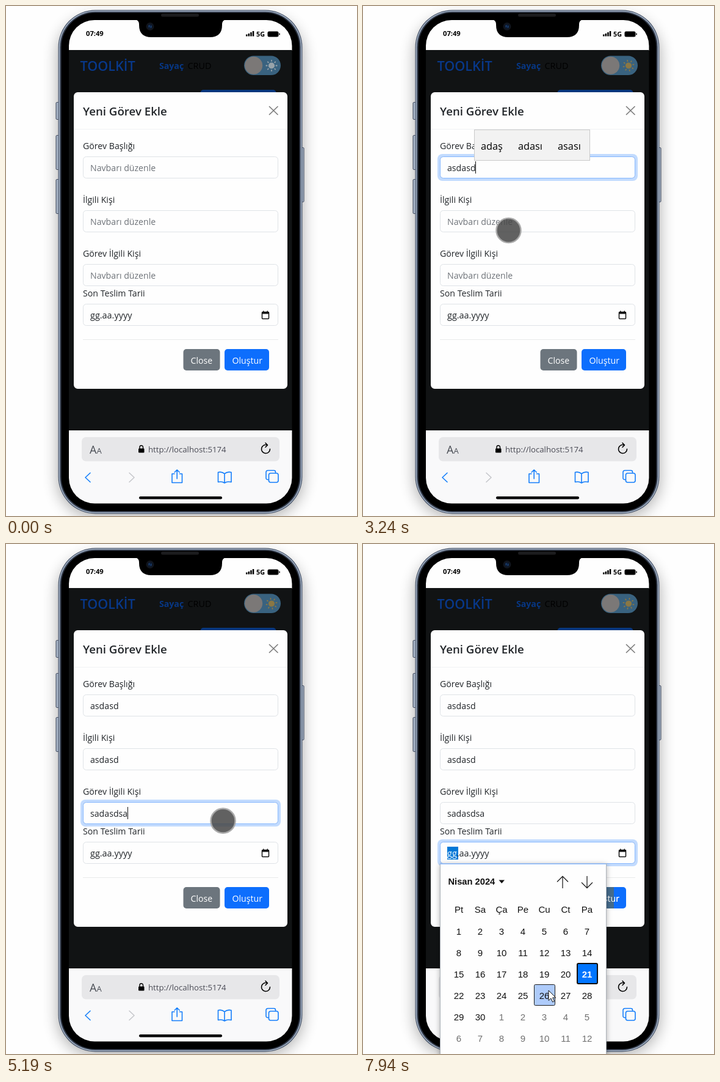
Recreate the animation shown at these times as an HTML page. Size 575 px wide and 834 px high, loop 7990 ms.

```html
<!DOCTYPE html>
<html lang="tr">
<head>
<meta charset="utf-8">
<title>Yeni Görev Ekle</title>
<style>
  html, body { margin: 0; width: 100%; height: 100%; overflow: hidden; background: #fefefe; }
  svg { display: block; width: 575px; height: 834px; font: 14.15px "Open Sans", "Noto Sans", sans-serif; fill: #212529; }
  .mid { text-anchor: middle; }
  .semi { font-weight: 600; }
  .line { fill: none; stroke-linecap: round; stroke-linejoin: round; }
  .ios { stroke: #147efb; stroke-width: 1.6; }
  .calendar { font: 15px "Liberation Sans", Arial, sans-serif; fill: #111; }
</style>
</head>
<body>
<svg id="stage" viewBox="0 0 575 834">
  <defs>
    <filter id="soft" x="-20%" y="-20%" width="140%" height="140%"><feGaussianBlur stdDeviation="12"/></filter>
    <filter id="lift" x="-20%" y="-20%" width="140%" height="140%">
      <feDropShadow dx="0" dy="1" stdDeviation="2" flood-opacity=".28"/>
    </filter>
    <filter id="float" x="-20%" y="-20%" width="140%" height="140%">
      <feDropShadow dx="0" dy="2" stdDeviation="4" flood-opacity=".32"/>
    </filter>
    <clipPath id="screen"><rect x="103" y="23" width="365.500" height="790.500" rx="42"/></clipPath>
  </defs>

  <!-- phone body -->
  <rect x="84" y="18" width="403" height="818" rx="62" fill="#000" opacity=".3" filter="url(#soft)"/>
  <g fill="#a9b6c8" stroke="#394357">
    <rect x="82" y="157.500" width="5" height="28" rx="1.500"/>
    <rect x="82" y="211.500" width="5" height="56" rx="1.500"/>
    <rect x="82" y="283.500" width="5" height="56" rx="1.500"/>
    <rect x="484" y="231.500" width="4" height="89" rx="1.500"/>
  </g>
  <rect x="85.500" y="6.500" width="400" height="824" rx="61" fill="#4c586c"/>
  <rect x="86.700" y="7.700" width="397.600" height="821.600" rx="60" fill="#a8b7cb"/>
  <rect x="88.300" y="9.300" width="394.400" height="818.400" rx="58" fill="#343d4d"/>
  <rect x="90.500" y="11" width="390" height="815" rx="56" fill="#000"/>
  <rect x="254" y="12.500" width="62" height="5" rx="2.500" fill="#1c1c1e"/>

  <!-- screen -->
  <g clip-path="url(#screen)">
    <rect x="103" y="23" width="366" height="50" fill="#fefefe"/>
    <rect x="103" y="72" width="366" height="623" fill="#111314"/>
    <rect x="103" y="694" width="366" height="120" fill="#f9f9fa"/>
    <path d="M211 22Q218 23 218 30V31Q218 51 238 51H334Q354 51 354 31V30Q354 23 361 22Z" fill="#000"/>
  </g>
  <circle cx="236" cy="33.500" r="6.500" fill="#11151d"/>
  <circle cx="236" cy="33.500" r="3.500" fill="#0b1c36"/>
  <path d="M234.500 31.500v3M237.500 32.500v3" stroke="#2a5a9c" fill="none"/>

  <g fill="#000" font-weight="700">
    <text x="131" y="49" font-size="11.200">07:49</text>
    <text x="410" y="50" font-size="10.800">5G</text>
    <path d="M393 46.500h2.500v3h-2.500zM396.600 45h2.500v4.500h-2.500zM400.200 43h2.500v6.500h-2.500zM403.800 41h2.500v8.500h-2.500z"/>
    <rect x="428.500" y="41.500" width="18" height="9" rx="2.500"/>
    <rect x="447.300" y="44.500" width="1.500" height="3" rx=".7"/>
  </g>

  <!-- dimmed page -->
  <text x="121.500" y="106" font-size="21.600" class="semi" fill="#08388a">TOOLKİT</text>
  <text x="251" y="103" font-weight="700" fill="#073784">Sayaç</text>
  <text x="297.500" y="103" font-size="14.400" fill="#000">CRUD</text>
  <rect x="390" y="81.500" width="60" height="31.500" rx="15.750" fill="#39627f"/>
  <circle cx="405.700" cy="97.300" r="14.500" fill="#7b7877"/>
  <g id="sun"></g>
  <rect x="318.500" y="137" width="124" height="20" rx="5" fill="#06377e"/>

  <!-- dialog -->
  <rect x="111" y="141" width="350" height="485" rx="6.500" fill="#fefefe"/>
  <text x="126" y="179" font-size="18.700" class="semi">Yeni Görev Ekle</text>
  <path d="M431.500 164.500l13.500 13M445 164.500l-13.500 13" class="line" stroke="#7c7c7c" stroke-width="1.700"/>
  <path d="M111 201.500h350" stroke="#f1f2f4"/>
  <path d="M126 545.500h320" stroke="#e9eaeb"/>
  <g id="fields"></g>
  <g id="dateIcon" fill="none" stroke="#111">
    <rect x="419.500" y="500.500" width="11" height="11" rx="1" stroke-width="1.500"/>
    <path d="M419 502h12" stroke-width="3"/><path d="M421.800 498.500v2M428.200 498.500v2" stroke-width="1.500"/>
  </g>
  <rect x="290.500" y="561" width="60" height="35" rx="5" fill="#6c757d"/>
  <text x="302.500" y="585" fill="#fff">Close</text>
  <rect x="358" y="561" width="73" height="35" rx="5" fill="#0d6efd"/>
  <text x="370.500" y="585" fill="#fff">Oluştur</text>

  <!-- browser bar -->
  <rect x="124" y="705" width="324" height="39.500" rx="7" fill="#e7e7e9"/>
  <text x="137" y="732" font-size="18" fill="#4b4f56">A<tspan font-size="13">A</tspan></text>
  <rect x="217" y="723.500" width="9.500" height="7" rx="1.200" fill="#000"/>
  <path d="M219 724v-2.500a2.750 2.750 0 0 1 5.500 0v2.500" class="line" stroke="#000" stroke-width="1.400"/>
  <text x="233" y="730" font-size="13.200" fill="#4a4b55">http://localhost:5174</text>
  <path d="M432.500 724.500a7 7 0 1 1-4.500-6.500M425 714.500l3.500 3.500-3.500 3.500" class="line" stroke="#000" stroke-width="1.600"/>
  <g class="line ios">
    <path d="M138 763.500l-8 7.500 8 7.500"/>
    <path d="M202 763.500l8 7.500-8 7.500" stroke="#c6c7cb"/>
    <path d="M276 765h-4v14.500h16.500V765h-4M280.200 773V758.500M276.200 762.500l4-4 4 4"/>
    <path d="M358 765q-4-4-10.500-2.500v16q6.500-1.500 10.500 1.500 4-3 11-1.500v-16q-7-1.500-11 2.500v14.500"/>
    <rect x="430.500" y="764" width="15.500" height="15" rx="3"/>
    <path d="M430 774.500h-1.500a2.500 2.500 0 0 1-2.500-2.500v-9.500a3 3 0 0 1 3-3h10a2.500 2.500 0 0 1 2.500 2.500v1.500"/>
  </g>
  <rect x="218" y="802" width="136" height="4.500" rx="2.250" fill="#000"/>

  <!-- overlays -->
  <g id="suggest"></g>
  <g id="history"></g>
  <g id="calendar" class="calendar"></g>
  <g id="pointer">
    <g id="touch">
      <circle r="20" fill="#484848" fill-opacity=".86" stroke="#a9a9a9" stroke-opacity=".9" stroke-width="2.600"/>
      <circle id="press" r="15.500" fill="#aeab30"/>
    </g>
    <path id="arrow" d="M0 0V16.500L3.900 12.900L6.600 19L9.300 17.800L6.700 11.900H11.800Z" fill="#fff" stroke="#111" stroke-linejoin="round"/>
  </g>
</svg>

<script>
const LOOP = 7990;
const $ = id => document.getElementById(id);
const clamp = v => Math.max(0, Math.min(1, v));
const show = (el, on) => el.setAttribute('visibility', on ? 'inherit' : 'hidden');
const move = (el, x, y) => el.setAttribute('transform', `translate(${x} ${y})`);
const within = (t, [from, to]) => t >= from && t < to;

function set(el, attrs) {
  for (const key in attrs) el.setAttribute(key, attrs[key]);
}

function add(parent, tag, attrs = {}, text = '') {
  const el = document.createElementNS('http://www.w3.org/2000/svg', tag);
  set(el, attrs);
  el.textContent = text;
  parent.append(el);
  return el;
}

// focus: time span of the focus ring; typing: span over which the value is keyed in
const fields = [
  { label: 'Görev Başlığı', y: 246.5, focus: [1340, 3320], value: 'asdasd', typing: [1850, 2480], words: [1960, 3310] },
  { label: 'İlgili Kişi', y: 334.5, focus: [3320, 4230], value: 'asdasd', typing: [3480, 4000], words: [3600, 4220], list: [3340, 3500] },
  { label: 'Görev İlgili Kişi', y: 422.5, focus: [4230, 5780], value: 'sadasdsa', typing: [4540, 5040], words: [4640, 5100], list: [4270, 4560] },
  { label: 'Son Teslim Tarii', y: 487.5, focus: [5780, 9999] }
];

// [time, x, y]
const path = [
  [60, 540, 811], [300, 452, 590], [560, 312, 360], [800, 253, 274], [1200, 256, 273],
  [2590, 256, 273], [3100, 238.5, 367], [3450, 238.5, 367], [3950, 239, 405], [4080, 239, 436], [4200, 183, 444],
  [4900, 183, 444], [5170, 355, 451], [5450, 388, 553], [5740, 425, 506], [5970, 427, 502],
  [6250, 361, 495], [6480, 370, 498], [6740, 425, 506], [6950, 425, 506], [7250, 372, 625],
  [7540, 324, 731], [7800, 304, 730]
];
const arrowSpans = [[60, 280], [3380, 3500], [4280, 4720], [5860, 6060], [6860, LOOP]];
const presses = [[1270, 1400], [3270, 3360], [4200, 4280], [5750, 5850], [6780, 6860]];
const CALENDAR_AT = 6860;

for (const f of fields) {
  const root = $('fields');
  const box = { x: 126.5, y: f.y, width: 319, height: 35, rx: 5 };
  f.ring = add(root, 'rect', { x: 122, y: f.y - 4.5, width: 328, height: 44, rx: 8, fill: '#c2dbfe' });
  add(root, 'rect', { ...box, fill: '#fefefe', stroke: '#dfe3e7' });
  f.edge = add(root, 'rect', { ...box, fill: 'none', stroke: '#86b7fe' });
  add(root, 'text', { x: 126, y: f.y - 12.5 - (f.value ? .5 : 0) }, f.label);
  const baseline = f.y + 23.5;
  if (f.value) {
    f.text = add(root, 'text', { x: 138, y: baseline });
    f.caret = add(root, 'path', { stroke: '#111' });
  } else {
    f.mark = add(root, 'rect', { x: 138, y: f.y + 7.5, width: 18, height: 21, fill: '#0078d7' });
    const date = add(root, 'text', { x: 138, y: baseline, 'font-size': 14.4 });
    f.day = add(date, 'tspan', {}, 'gg');
    add(date, 'tspan', {}, '.aa.yyyy');
  }
}

const sun = $('sun');
add(sun, 'circle', { r: 4.6 });
for (let i = 0; i < 8; i++)
  add(sun, 'path', { d: 'M7.400 0h1.300', 'stroke-width': 1.8, 'stroke-linecap': 'round', transform: `rotate(${i * 45})` });

const suggest = $('suggest');
add(suggest, 'rect', { x: .5, y: .5, width: 189, height: 50, fill: '#f2f2f2', stroke: '#c9c9c9' });
['adaş', 'adası', 'asası'].forEach((word, i) =>
  add(suggest, 'text', { x: [11, 72, 137][i], y: 33, 'font-size': 16.3, fill: '#000' }, word));

const list = $('history');
add(list, 'path', {
  d: 'M257 0H266L275.500 -9L285 0H437.500Q445.500 0 445.500 8V273.500Q445.500 281.500 437.500 281.500H257Q249 281.500 249 273.500V8Q249 0 257 0Z',
  fill: '#fefefe', filter: 'url(#lift)'
});
['asdasd', 'asdas', 'dddddddddd', 'asd', 'asda', 'ddd'].forEach((word, i) =>
  add(list, 'text', { x: 264, y: 33.5 + 45 * i, 'font-size': 15.2, class: 'semi' }, word));

const cal = $('calendar');
const cellBox = (col, row, inset) =>
  ({ x: 140 + 35 * col + inset, y: 615 + 35 * row + inset, width: 35 - 2 * inset, height: 35 - 2 * inset, rx: 2 });
add(cal, 'rect', { x: 398, y: 561, width: 13, height: 35, fill: '#456b8c' });
add(cal, 'text', { x: 370.5, y: 585, fill: '#fff', style: 'font:14.15px "Open Sans",sans-serif' }, 'Oluştur');
add(cal, 'rect', { x: 126.5, y: 522.5, width: 272, height: 330, fill: '#fefefe', stroke: '#aeb4bb', filter: 'url(#float)' });
add(cal, 'path', { d: 'M126 523h272', stroke: '#86b7fe', 'stroke-width': 1.5 });
add(cal, 'text', { x: 139.5, y: 557, 'font-size': 14.7, 'font-weight': 700 }, 'Nisan 2024');
add(cal, 'path', { d: 'M222.500 549.500h9.500l-4.750 5.500z' });
add(cal, 'path', {
  d: 'M327 563V543.500M318 552.500l9-9 9 9M367 543V562.500M358 553.500l9 9 9-9',
  fill: 'none', stroke: '#222', 'stroke-width': 1.3
});
const hover = add(cal, 'rect', { fill: '#aecbfa', stroke: '#1c1c1c' });
add(cal, 'rect', { ...cellBox(6, 2, 1), fill: '#0075ff', stroke: '#101010', 'stroke-width': 2 });
['Pt', 'Sa', 'Ça', 'Pe', 'Cu', 'Ct', 'Pa'].forEach((name, i) =>
  add(cal, 'text', { x: 157 + 35 * i, y: 603, class: 'mid' }, name));
for (let i = 0; i < 42; i++) {
  const today = i === 20;
  add(cal, 'text', {
    x: 157 + 35 * (i % 7), y: 639 + 35 * Math.floor(i / 7), class: 'mid',
    fill: today ? '#fff' : i < 30 ? '#111' : '#707070', 'font-weight': today ? 700 : 400
  }, i % 30 + 1);
}

function pointerAt(t) {
  const next = path.findIndex(p => p[0] > t);
  if (next < 0) return path[path.length - 1].slice(1);
  if (next === 0) return path[0].slice(1);
  const [t0, x0, y0] = path[next - 1], [t1, x1, y1] = path[next];
  const k = (t - t0) / (t1 - t0), ease = k * k * (3 - 2 * k);
  return [x0 + (x1 - x0) * ease, y0 + (y1 - y0) * ease];
}

function drawField(f, t) {
  const focused = within(t, f.focus);
  const glow = clamp((t - f.focus[0]) / 150) - clamp((t - f.focus[1]) / 150);
  f.ring.setAttribute('opacity', glow);
  f.edge.setAttribute('opacity', glow);
  if (!f.value) {
    show(f.mark, focused);
    f.day.setAttribute('fill', focused ? '#fff' : '#212529');
    return;
  }
  const [from, to] = f.typing;
  const typed = t < from ? '' : f.value.slice(0, 1 + Math.floor(clamp((t - from) / (to - from)) * (f.value.length - 1)));
  f.text.textContent = typed || 'Navbarı düzenle';
  f.text.setAttribute('fill', typed ? '#212529' : '#6d7278');
  const end = Math.floor(138 + (typed ? f.text.getComputedTextLength() : 0)) + .5;
  f.caret.setAttribute('d', `M${end} ${f.y + 7.5}v20`);
  show(f.caret, focused);
  if (within(t, f.words)) {
    show(suggest, true);
    move(suggest, Math.round(end - 2.5), Math.round(f.y - 44.5));
  }
  if (f.list && within(t, f.list)) {
    show(list, true);
    move(list, 0, f.y + 46.5);
  }
}

function render(t) {
  show(suggest, false);
  show(list, false);
  fields.forEach(f => drawField(f, t));

  const sunColor = t < 60 ? '#98a3aa' : '#8a7744';
  set(sun, { transform: `translate(435 97.500) rotate(${t * .024})`, fill: sunColor, stroke: sunColor });

  const [x, y] = pointerAt(t);
  const asArrow = arrowSpans.some(span => within(t, span));
  move($('pointer'), x, y);
  show($('pointer'), t >= 60);
  show($('arrow'), asArrow);
  show($('touch'), !asArrow);
  show($('press'), !asArrow && presses.some(span => within(t, span)));

  const open = t >= CALENDAR_AT;
  const col = Math.floor((x - 140) / 35), row = Math.floor((y - 615) / 35);
  show(cal, open);
  show(hover, open && col >= 0 && col < 7 && row >= 0);
  set(hover, cellBox(col, row, .5));
}

const start = performance.now();
function tick() {
  render((performance.now() - start) % LOOP);
  requestAnimationFrame(tick);
}
tick();
</script>
</body>
</html>
```
